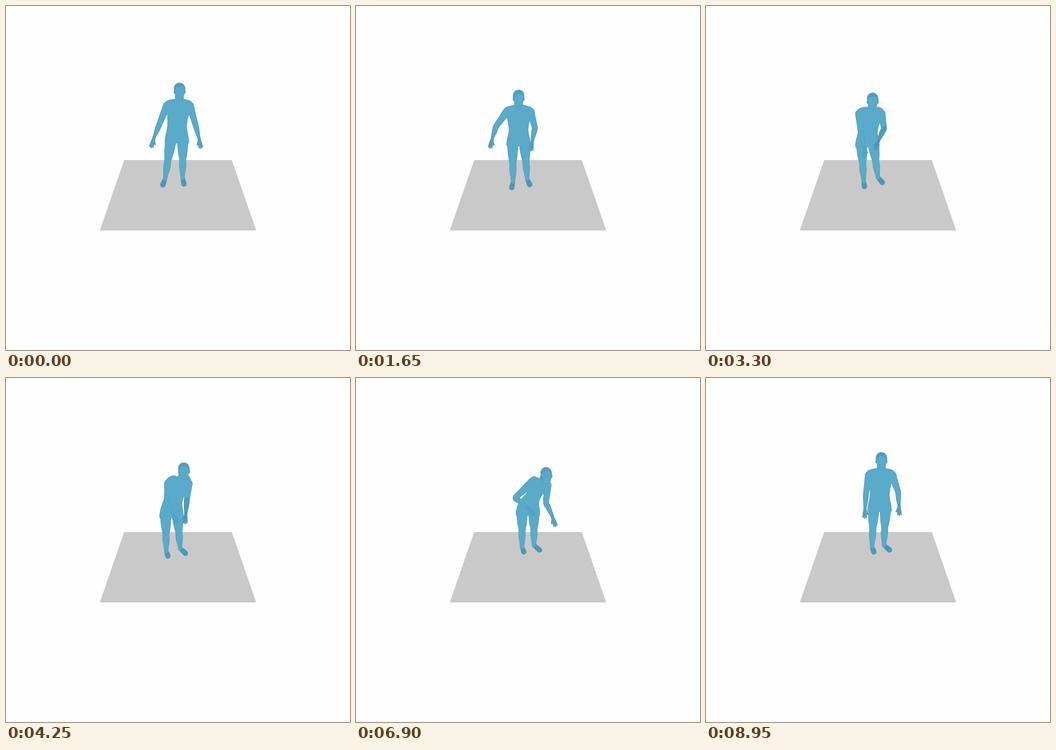
Write an HTML page with a canvas that moves like this. It is 748 px wide and 748 px high and loops after 9 s.

```html
<!DOCTYPE html>
<html lang="en">
<head>
<meta charset="utf-8">
<title>Bending figure</title>
<style>
  html, body { margin: 0; width: 100%; height: 100%; overflow: hidden; background: #fefefe; }
  canvas { display: block; width: 748px; height: 748px; }
</style>
</head>
<body>
<canvas id="stage" width="748" height="748"></canvas>
<script>
const ctx = document.getElementById('stage').getContext('2d');
const LOOP = 9000, STEP = 50;
const SKIN = '#5aaac9', EDGE = '#4991b1', FOOT = '#4d97b7';
const LEFT = -1, RIGHT = 1;

const lerp = (a, b, k) => a + (b - a) * k;
const between = (a, b, k) => [lerp(a[0], b[0], k), lerp(a[1], b[1], k)];
const ease = (t, from, to) => {
  const k = Math.min(1, Math.max(0, (t - from) / (to - from)));
  return k * k * (3 - 2 * k);
};

// Smooth motion of one point through [time, x, y] keys, at rest after the last
function track(...keys) {
  const last = keys.length - 1;
  const at = i => keys[Math.min(last, Math.max(0, i))];
  const slope = (i, c) => i >= last ? 0 : .7 * (at(i + 1)[c] - at(i - 1)[c]) / (at(i + 1)[0] - at(i - 1)[0]);
  return t => {
    if (t >= at(last)[0]) return at(last).slice(1);
    const i = keys.findIndex(key => key[0] > t) - 1;
    const span = at(i + 1)[0] - at(i)[0], k = (t - at(i)[0]) / span;
    return [1, 2].map(c => lerp(at(i)[c], at(i + 1)[c], k * k * (3 - 2 * k)) +
      span * k * (1 - k) * ((1 - k) * slope(i, c) - k * slope(i + 1, c)));
  };
}

// The end points of the body lead; everything between them follows by rule
const motion = {
  head: track([0, 377.5, 185], [950, 365.5, 190], [2450, 345, 210.5], [4250, 387, 202],
    [5600, 405, 219], [6900, 414, 212], [8450, 382, 181], [8950, 381.5, 179.5]),
  hips: track([0, 371.5, 290], [950, 362.5, 292], [2450, 345.5, 300], [4250, 360, 296],
    [5600, 367.5, 299], [6900, 374, 290], [8450, 377.5, 282]),
  leftWrist: track([0, 322, 286], [950, 317, 286], [1750, 296, 288], [2450, 321, 313],
    [4250, 364, 296], [5600, 377, 298], [6900, 373, 282], [8450, 346, 282]),
  rightWrist: track([0, 419.5, 287], [950, 402, 293], [2450, 367, 291], [4250, 391, 294],
    [5600, 411, 305], [6900, 427, 301], [7350, 438, 294], [8450, 419.5, 276]),
  leftFoot: track([0, 341, 389], [2450, 339, 396], [4250, 352, 387], [6900, 365, 378]),
  rightFoot: track([0, 387, 387], [950, 379, 390], [2450, 378, 386], [4250, 390, 381], [6900, 399, 374])
};

function spline(nodes, detail = 8) {
  const out = [], last = nodes.length - 1;
  for (let i = 0; i < last; i++) {
    const p = nodes[Math.max(0, i - 1)], a = nodes[i], b = nodes[i + 1], n = nodes[Math.min(last, i + 2)];
    for (let j = 0; j < detail; j++) {
      const k = j / detail;
      out.push(a.map((v, c) => v + .5 * k * (b[c] - p[c] +
        k * (2*p[c] - 5*v + 4*b[c] - n[c] + k * (3 * (v - b[c]) + n[c] - p[c])))));
    }
  }
  return [...out, nodes[last]];
}

// Tapered tube through [x, y, radius] nodes; `sides` holds its lower edges without caps
function limb(...nodes) {
  const line = spline(nodes), path = new Path2D(), sides = new Path2D();
  const end = line.length - 1, quarter = Math.PI / 2;
  const dirs = line.map((_, i) => {
    const a = line[Math.max(0, i - 1)], b = line[Math.min(end, i + 1)];
    return Math.atan2(b[1] - a[1], b[0] - a[0]);
  });
  const rim = turn => line.map(([x, y, r], i) =>
    [x + r * Math.cos(dirs[i] + turn), y + r * Math.sin(dirs[i] + turn)]);
  const rims = [rim(quarter), rim(-quarter)];
  rims[0].forEach(p => path.lineTo(...p));
  path.arc(...line[end], dirs[end] + quarter, dirs[end] - quarter, true);
  [...rims[1]].reverse().forEach(p => path.lineTo(...p));
  path.arc(...line[0], dirs[0] - quarter, dirs[0] + quarter, true);
  path.closePath();
  for (const edge of rims)
    edge.slice(end * .45 | 0).forEach((p, i) => i ? sides.lineTo(...p) : sides.moveTo(...p));
  path.sides = sides;
  return path;
}

function closedCurve(nodes) {
  const path = new Path2D(), n = nodes.length, at = i => nodes[(i + n) % n];
  path.moveTo(...nodes[0]);
  nodes.forEach((a, i) => {
    const p = at(i - 1), b = at(i + 1), c = at(i + 2);
    path.bezierCurveTo(a[0] + (b[0] - p[0]) / 6, a[1] + (b[1] - p[1]) / 6,
      b[0] - (c[0] - a[0]) / 6, b[1] - (c[1] - a[1]) / 6, ...b);
  });
  return path;
}

function buildTorso(chest, hips, neck, span, lean) {
  const pit = between(chest, hips, .27), waist = between(chest, hips, .62);
  const half = side => {
    const out = ([x, y], dx, dy = 0) => [x + side * dx, y + dy];
    const collar = out(neck, 8.8), shoulder = out(chest, span + 3.5, -6);
    const slope = between(collar, shoulder, .5);
    return [
      collar, out(slope, 0, -1.5 - Math.max(0, lean) * .3), shoulder,
      out(pit, span - 2.5), out([waist[0] - lean * .25, waist[1]], 20.5),
      out(hips, 24.8, -3), out(hips, 23, 10)
    ];
  };
  return closedCurve([...half(LEFT), [hips[0], hips[1] + 8], ...half(RIGHT).reverse()]);
}

function buildArm(shoulder, wrist, side, lean) {
  // The nearer the wrist, the further the elbow swings out
  const reach = Math.hypot(wrist[0] - shoulder[0], wrist[1] - shoulder[1]);
  const bend = side * (74 - reach) * .6 - lean * Math.abs(lean) / 40;
  const middle = between(shoulder, wrist, .56);
  const elbow = [middle[0] + bend, middle[1]];

  const angle = Math.atan2(wrist[1] - elbow[1], wrist[0] - elbow[0]);
  const aim = Math.atan2(Math.sin(angle) + .3, Math.cos(angle));
  const along = (d, across = 0) => [
    wrist[0] + d * Math.cos(aim) - across * Math.sin(aim),
    wrist[1] + d * Math.sin(aim) + across * Math.cos(aim)
  ];
  const fingers = [-1, 0, 1].map(s =>
    limb([...along(9, s * 2), 1.5], [...along(23 - Math.abs(s) * 2, s * 3.6), .6]));
  const lower = [[...between(elbow, wrist, .35), 5], [...wrist, 2.6]];
  return {
    whole: limb([...shoulder, 7.8], [...between(shoulder, elbow, .5), 6.5], [...elbow, 5.5], ...lower),
    forearm: limb([...elbow, 5.3], ...lower),
    hand: [
      limb([...wrist, 2.5], [...along(9), 3.1]),
      limb([...along(3), 1.6], [...along(14, side * 6.5), .7]),
      ...fingers
    ]
  };
}

function buildLeg(hips, toe, side, heading) {
  const hip = [hips[0] + side * 12.8, hips[1]];
  const ankle = [toe[0] + 1 - side * 4 - heading, toe[1] - 13 + heading * .3];
  const down = k => between(hip, ankle, k);
  return {
    shin: limb([...hip, 11.8], [...down(.32), 9.6], [...down(.53), 6.8],
      [...down(.7), 6.9], [...down(.87), 4.8], [...ankle, 3.6]),
    foot: limb([...ankle, 3.6], [...between(ankle, toe, .6), 4.7], [...toe, 5])
  };
}

function fill(paths, colour, alpha = 1) {
  ctx.globalAlpha = alpha;
  ctx.fillStyle = colour;
  paths.forEach(p => ctx.fill(p));
  ctx.globalAlpha = 1;
}

function stroke(paths, width, alpha = 1) {
  ctx.globalAlpha = alpha;
  ctx.strokeStyle = EDGE;
  ctx.lineWidth = width;
  paths.forEach(p => ctx.stroke(p));
  ctx.globalAlpha = 1;
}

function drawFloor() {
  ctx.fillStyle = '#c9c9c9';
  ctx.beginPath();
  [[257, 335], [491, 335], [544, 488], [204, 488]].forEach(p => ctx.lineTo(...p));
  ctx.fill();
}

function drawHead([x, y], tilt) {
  const ears = [LEFT, RIGHT].map(side => limb([side * 12, 1, 1.1], [side * 11.5, 5, .8]));
  const skull = limb([0, -6, 11.8], [0, 2, 11.3], [0, 10, 8.2]);
  ctx.save();
  ctx.translate(x, y);
  ctx.rotate(tilt * Math.PI / 180);
  fill(ears, EDGE);
  stroke([skull], 1.4, .7);
  fill([skull], '#519ebf');
  fill([limb([0, 0, 10], [0, 10, 8.2])], SKIN);
  ctx.restore();
}

function drawFigure(t) {
  const { head, hips, leftWrist, rightWrist, leftFoot, rightFoot } =
    Object.fromEntries(Object.entries(motion).map(([name, move]) => [name, move(t)]));
  const lean = (head[0] - hips[0]) * .55;
  const span = 26 - Math.abs(lean) * .25;
  const heading = 9 * ease(t, 0, 5000);
  const shade = .6 * ease(t, 1500, 2400) * (1 - ease(t, 5800, 6800));

  const chest = [lerp(head[0], hips[0], .45), lerp(head[1], hips[1], .31) - Math.abs(lean) * .15];
  const neck = [lerp(head[0], chest[0], .3), chest[1] - 14];
  const shoulder = side => [chest[0] + side * span, chest[1]];

  const arms = [
    buildArm(shoulder(LEFT), leftWrist, LEFT, lean),
    buildArm(shoulder(RIGHT), rightWrist, RIGHT, lean)
  ];
  const legs = [buildLeg(hips, leftFoot, LEFT, heading), buildLeg(hips, rightFoot, RIGHT, heading)];
  const feet = legs.map(leg => leg.foot);
  const hands = arms.flatMap(arm => arm.hand);
  const body = [
    buildTorso(chest, hips, neck, span, lean),
    limb([head[0], head[1] + 8, 8.4], [...neck, 8.8]),
    ...legs.map(leg => leg.shin),
    ...arms.map(arm => arm.whole)
  ];

  stroke([...body, ...hands, ...feet], 1.5);
  fill(feet, FOOT);
  fill(body, SKIN);
  stroke(arms.map(arm => arm.whole.sides), 1, .5);
  stroke(hands, .8, .7);
  fill(hands, '#55a3c3');
  fill([arms[1].forearm, ...arms[1].hand], EDGE, shade);
  drawHead(head, -lean * .25);
}

function frame(now) {
  ctx.fillStyle = '#fefefe';
  ctx.fillRect(0, 0, 748, 748);
  drawFloor();
  drawFigure(Math.floor((now % LOOP) / STEP) * STEP);
}

let start;
function tick(now) {
  start ??= now;
  frame(now - start);
  requestAnimationFrame(tick);
}
frame(0);
requestAnimationFrame(tick);
</script>
</body>
</html>
```
